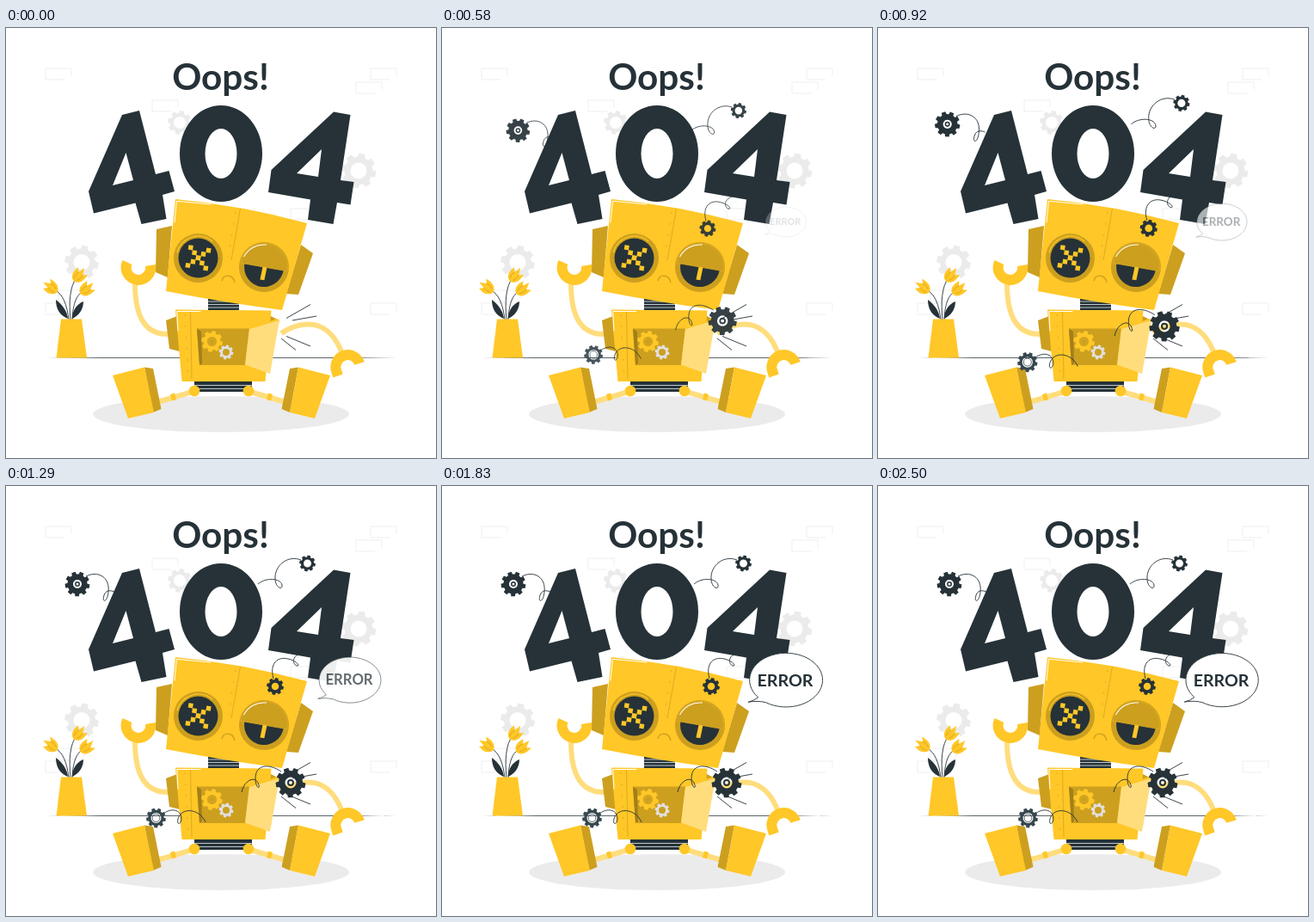
Animation of 500 by 500 pixels, one loop 2.54 s. Source, as an HTML page:

```html
<!DOCTYPE html>
<html lang="en">
<head>
<meta charset="utf-8">
<title>404 robot</title>
<style>
  html, body { margin: 0; height: 100%; overflow: hidden; background: #fff; }
  svg { display: block; width: 100vw; height: 100vh; }
  text { font-family: Lato, "Open Sans", sans-serif; font-weight: 700; text-anchor: middle; }
  .dark, text { fill: #263238; }
  .yellow { fill: #ffc727; }
  .shade { fill: #cc9f1f; }
  .pale { fill: #ffdd7d; }
  .grey { fill: #e0e0e0; }
  .mist { fill: #ebebeb; }
  .slate { fill: #37474f; }
  .line { fill: none; stroke: #263238; stroke-width: .9; }
  .brick { fill: none; stroke: #ebebeb; stroke-width: .8; }
  .limb { fill: none; stroke: #ffdd7d; stroke-width: 6; }
  .claw { fill: none; stroke: #ffc727; stroke-width: 12; }
  .seam { fill: none; stroke: #cc9f1f; stroke-width: .7; }
  .shine { fill: none; stroke: #fff; stroke-width: 1; stroke-linecap: round; }
  .rib { fill: none; stroke: #cfd8dc; stroke-width: .9; }
</style>
</head>
<body>
<svg viewBox="0 0 500 500">
  <!-- Background -->
  <g id="bricks"></g>
  <g class="mist">
    <path data-gear="88 272.5 20 8 9.5"/>
    <path data-gear="410 166 20.5 8 9.5"/>
    <path data-gear="202 110 14 8 7"/>
  </g>
  <path class="dark" d="M46 383.500L110 383.200H400L454 383.500L400 383.900H110Z"/>
  <ellipse class="mist" cx="250" cy="449" rx="149" ry="21"/>

  <!-- Flowers -->
  <path class="line" d="M73 339C71 322 66 309 57 305M75 339C73 320 74 300 82 291M77 339C78 320 82 310 90 306"/>
  <path class="dark" d="M72 338C62 334 58 326 58 316C66 322 71 329 72 338ZM77 338C77 329 82 321 90 318C90 326 86 334 77 338Z"/>
  <g id="flowers"></g>
  <path class="yellow" d="M64 338.500H88L94 383.500H58.500Z"/>

  <!-- Heading and numerals -->
  <text x="249.500" y="72" font-size="42.300">Oops!</text>
  <g class="pop" data-origin="214 238" data-start="-25" data-length="1000">
    <path class="line" d="M93 105C107 98 121 106 119 123C118 136 111 136 114 127C116 121 121 121 126 123"/>
    <path class="line" d="M343 86C328 80 312 92 313 108C313 118 322 122 321 115C319 107 302 106 293 114"/>
    <path class="dark" data-gear="83 114 14.500 9 5 3 1.5"/>
    <path class="dark" data-gear="350.500 90 9.500 8 4.500"/>
  </g>
  <g class="dark" fill-rule="evenodd">
    <path d="M135 101L155 96L174 170L189.500 166L196 190L182 194L186.500 222L157.500 228L150.500 203.500L102 215.500L96 190ZM124 183L148 177L139.500 145Z"/>
    <path d="M202 146a48 56 0 1 1 96 0a48 56 0 1 1-96 0ZM231.500 146a18.500 29 0 1 0 37 0a18.500 29 0 1 0-37 0Z"/>
    <path d="M381 97.500L400.500 101L389 177L404.500 179L400.500 205.500L385 203L380.500 228L351 223L354 199.500L305 191L308.500 165ZM338 169L363 173L367 141Z"/>
  </g>

  <!-- Legs -->
  <path class="limb" d="M176 435L217 423M284 423L325 435"/>
  <path class="yellow" d="M191 426L196 424.500L198 432L193 433.500ZM310 426L305 424.500L303 432L308 433.500Z"/>
  <path class="shade" d="M161 394.500L171 396L180.500 443L171 447ZM340 394.500L330 396L320.500 443L330 447Z"/>
  <path class="yellow" d="M124 404L161 394.500L172 447L142 454ZM377 404L340 394.500L330 447L359 454Z"/>
  <path class="dark" d="M219 411H286V423H219Z"/>
  <path class="rib" d="M219 415.500H286M219 419.500H286"/>
  <circle class="yellow" cx="219" cy="422" r="6.300"/>
  <circle class="yellow" cx="282" cy="422" r="6.300"/>

  <!-- Arms -->
  <path class="limb" d="M190 356C163 357 150 338 150 297M320 355C333 346 346 343 358 345C374 348 385 362 391 379"/>
  <path class="claw" d="M141 272.500A14.300 14.300 0 1 0 168 276M386 404.500L384 398.500A14 14 0 0 1 411 390"/>

  <!-- Body -->
  <path class="shade" d="M186 340L199 335L202 376L190 373ZM304 333L318 340L309 372L298 376Z"/>
  <path class="yellow" d="M197 327.500L308.500 328.500L301.500 411H204.500Z"/>
  <path class="seam" d="M214.500 330L216 408"/>
  <path class="seam" d="M208 333L212 406" stroke-dasharray="2 11"/>
  <path class="shine" d="M200 352L198.800 329.500L226 329.500"/>
  <path class="shade" d="M222 349.500H283L278 392H225Z"/>
  <path d="M222 349.500L227 353L228 390L225 392Z" fill="#a37f19"/>
  <path class="yellow" data-gear="239.500 364.500 12.500 8 5.500 3.800"/>
  <path class="shade" d="M236 364.500a3.500 3.500 0 1 0 7 0a3.500 3.500 0 1 0-7 0Z"/>
  <path class="grey" data-gear="256 377 8.500 8 4"/>
  <path class="pale" d="M283 350L318 339.500L307 402L278 391.500Z"/>
  <path class="yellow" d="M318 339.500L315 338L283 350Z"/>

  <!-- Head -->
  <path class="dark" d="M235 312H271V328H235Z"/>
  <path class="rib" d="M235 318H271M235 321.500H271M235 325H271"/>
  <path class="shade" d="M175 234L193 230L188 290L174 284ZM343 252L357 262L340 310L326 309Z"/>
  <path class="yellow" d="M197 199Q273 206 350 227L321 328Q252 319 186 306Z"/>
  <path class="shine" d="M196 226L198.500 201.300L238 205"/>
  <path class="seam" d="M272.500 210L262 270"/>
  <path class="seam" d="M267 214L258.500 266" stroke-dasharray="2 11"/>
  <path class="seam" d="M251 294C253 286 264 286 266 296" style="stroke-width:1.300"/>

  <circle class="shade" cx="223.500" cy="267.500" r="28.500"/>
  <path class="seam" d="M199 261A25.500 25.500 0 0 1 240 248" style="stroke:#ffc727;stroke-width:1.200"/>
  <circle class="dark" cx="223.500" cy="267.500" r="23"/>
  <g id="cross" class="yellow" transform="translate(223.500 267.300) rotate(9)"></g>

  <g transform="translate(300 278) rotate(10)">
    <circle class="shade" r="29"/>
    <circle class="dark" r="23"/>
    <path class="shade" d="M-28 0A28 28 0 0 1 28 0Z"/>
    <path class="seam" d="M-27.500 0A27.500 27.500 0 0 1 27.500 0Z" style="stroke:#e0af23"/>
    <path class="shine" d="M-25-8A26 26 0 0 1-2-26"/>
    <path class="yellow" d="M-1.500 0H3.500L3 15H-2Z"/>
  </g>

  <!-- Sparks -->
  <path class="line" d="M326 337.500L354 321.500M333 340L361 335M326 358.500L354 370M320 361L337 374.500"/>

  <g class="pop" data-origin="214 238" data-start="-25" data-length="1000">
    <path class="line" d="M311 224C306 206 316 198 328 201C338 203 343 210 338 209C333 207 332 198 343 194"/>
    <path class="line" d="M320 332C305 322 290 324 290 340C290 352 297 354 293 345C289 337 277 342 274 356"/>
    <path class="line" d="M183 381C192 374 203 376 204 386C204 394 198 395 200 387C205 372 226 376 232 391"/>
    <path class="dark" data-gear="313 233 10 8 4.300"/>
    <path class="dark" data-gear="331 345 17.500 9 6.500 4 2"/>
    <path class="slate" data-gear="174.500 386 11.500 9 6 4.800 4"/>
  </g>

  <!-- Speech bubble: a white backing, then the outline with the text -->
  <g class="pop" data-origin="399.500 225.500" data-start="130" data-length="2400">
    <path id="bubble" fill="#fff" d="M368 245.600Q363 249.500 356.500 251Q368 249 377 251.500A42 31 0 1 0 368 245.600Z"/>
  </g>
  <g class="pop" data-origin="399.500 225.500" data-start="130" data-length="2400">
    <use href="#bubble" stroke="#263238" stroke-width=".9"/>
    <text x="399" y="232.500" font-size="19.500">ERROR</text>
  </g>
</svg>
<script>
const LOOP = 2540;
const all = selector => [...document.querySelectorAll(selector)];
const fill = (id, html) => { document.getElementById(id).innerHTML = html; };

function gearPath(x, y, radius, teeth, ...holes) {
  const pitch = 2 * Math.PI / teeth;
  const points = [];
  for (let i = 0; i < teeth; i++) {
    for (const [offset, size] of [[-.33, .8], [-.23, 1], [.23, 1], [.33, .8]]) {
      const angle = (i + offset) * pitch + .2;
      points.push([x + radius * size * Math.cos(angle), y + radius * size * Math.sin(angle)]);
    }
  }
  const circle = r => `M${x - r} ${y}a${r} ${r} 0 1 0 ${2 * r} 0a${r} ${r} 0 1 0 ${-2 * r} 0Z`;
  return `M${points.join("L")}Z` + holes.map(circle).join("");
}

for (const path of all("[data-gear]")) {
  path.setAttribute("d", gearPath(...path.dataset.gear.split(" ").map(Number)));
  path.setAttribute("fill-rule", "evenodd");
}

const bricks = [[46, 47], [424, 47], [407, 63], [170, 84], [331, 210], [46, 320], [424, 320], [61, 305]];
fill("bricks", bricks.map(([x, y]) =>
  `<path class="brick" d="M${x + 30} ${y + 9}V${y}H${x}V${y + 13}H${x + 22}"/>`).join(""));

const flowers = [[58, 306, -55], [80, 293, 38], [88, 308, 48]];
fill("flowers", flowers.map(([x, y, turn]) => `<g transform="translate(${x} ${y}) rotate(${turn})">
  <path class="yellow" d="M0 2C-7 0-8-7-6-14L-2-10L0-18L4-10L8-14C9-6 7 1 0 2Z"/>
  <path class="seam" d="M-2-1Q-4-6-2-10M2-1Q5-5 4-10"/></g>`).join(""));

let squares = "";
for (let i = -2; i <= 2; i++) {
  for (const side of [-1, 1]) {
    squares += `<rect x="${i * 5.25 - 2.7}" y="${i * side * 5.25 - 2.7}" width="5.4" height="5.4"/>`;
  }
}
fill("cross", squares);

// Cubic Bezier (.36, -.01, .5, 1.38), solved by bisection
function ease(x) {
  if (x <= 0) return 0;
  if (x >= 1) return 1;
  const curve = (a, b, u) => 3 * a * u * (1 - u) ** 2 + 3 * b * u * u * (1 - u) + u ** 3;
  let low = 0, high = 1;
  for (let i = 0; i < 24; i++) {
    const mid = (low + high) / 2;
    if (curve(.36, .5, mid) < x) low = mid; else high = mid;
  }
  return curve(-.01, 1.38, low);
}

const pops = all(".pop");
function draw(now) {
  const time = now % LOOP;
  for (const group of pops) {
    const { origin, start, length } = group.dataset;
    const [x, y] = origin.split(" ");
    const progress = ease((time - start) / length);
    group.setAttribute("transform",
      `translate(${x} ${y}) scale(${.5 + progress / 2}) translate(${-x} ${-y})`);
    group.setAttribute("opacity", Math.min(1, Math.max(0, progress)));
  }
  requestAnimationFrame(draw);
}
draw(0);
</script>
</body>
</html>
```
